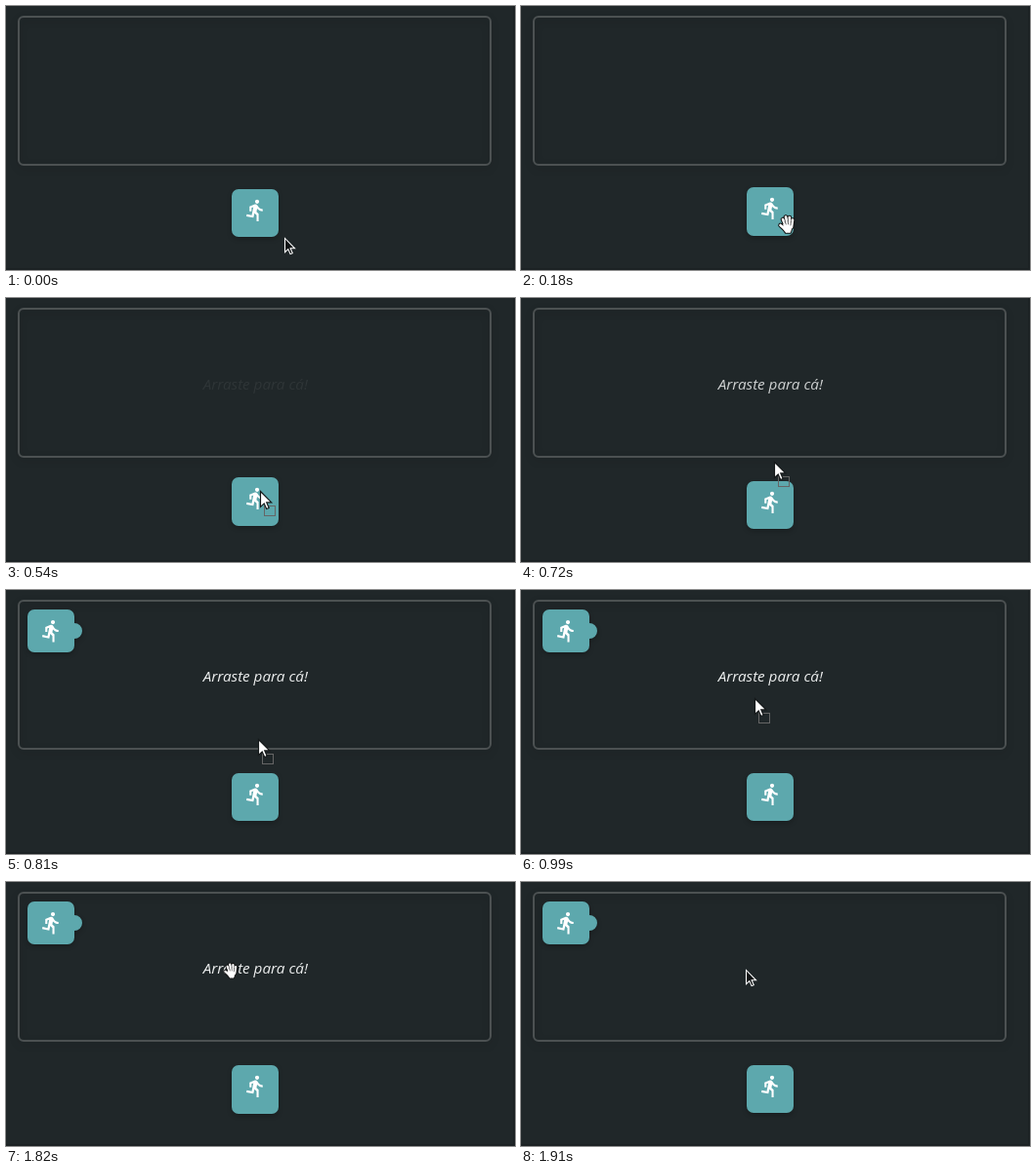
An HTML page with a canvas for the animation above (2.45 s loop, 521x271 px).

```html
<!DOCTYPE html>
<html lang="pt">
<head>
<meta charset="utf-8">
<title>Arraste</title>
<style>
html, body { margin: 0; width: 100%; height: 100%; overflow: hidden; background: #202729; }
canvas { display: block; width: 521px; height: 271px; }
</style>
</head>
<body>
<canvas id="stage" width="521" height="271"></canvas>
<script>
const ctx = document.getElementById('stage').getContext('2d');
const LOOP = 2450, STEP = 90;
const TEAL = '#5da8ad';

const runner = new Path2D('M13.49 5.48c1.1 0 2-.9 2-2s-.9-2-2-2-2 .9-2 2 .9 2 2 2zm-3.6 13.9l1-4.4 2.1 2v6h2v-7.5l-2.1-2 .6-3c1.3 1.5 3.3 2.5 5.5 2.5v-2c-1.9 0-3.5-1-4.3-2.4l-1-1.6c-.4-.6-1-1-1.7-1-.3 0-.5.1-.8.1l-5.2 2.2v4.7h2v-3.4l1.8-.7-1.6 8.1-4.9-1-.4 2 7 1.4z');
const arrow = new Path2D('M0 0V15L3.5 11.7L5.8 17L8.2 16L5.9 10.8H10.6Z');
const fingers = new Path2D('M-4 -5L-1 2M-1 -7.5L1 1M2.8 -7L3 1M6 -4.5L5 3M-6.5 1L-2 5');
const palm = new Path2D('M-3 0L5.5 0L5 4L3.5 8.5L-1 8.5L-4 4Z');

// Pointer path: time, x, y
const track = [[0, 284.5, 237.5], [360, 260, 210], [540, 260, 198], [810, 258, 152.5], [1080, 230, 90]];
// Button lift and label opacity, one value per step
const lifts = [0, 0, 2, 4, 5, 5, 4, 1];
const fade = { 6: .07, 7: .5, 8: .85 };

function pointer(t) {
  const i = track.findIndex(key => key[0] > t);
  if (i < 0) return track.at(-1).slice(1);
  const [t0, x0, y0] = track[i - 1], [t1, x1, y1] = track[i];
  const k = (t - t0) / (t1 - t0);
  return [Math.round(x0 + (x1 - x0) * k), Math.round(y0 + (y1 - y0) * k)];
}

function at(x, y, scale, draw) {
  ctx.save();
  ctx.translate(x, y);
  ctx.scale(scale, scale);
  draw();
  ctx.restore();
}

function shadow(alpha, blur, y) {
  ctx.shadowColor = `rgba(0,0,0,${alpha})`;
  ctx.shadowBlur = blur;
  ctx.shadowOffsetY = y;
}

function tile(x, y, h, tab) {
  ctx.save();
  shadow(.25, 5, 2);
  ctx.fillStyle = TEAL;
  ctx.beginPath();
  ctx.roundRect(x, y, 48, h, 7);
  if (tab) {
    ctx.moveTo(x + 56, y + 22);
    ctx.arc(x + 48, y + 22, 8, 0, Math.PI * 2);
  }
  ctx.fill();
  ctx.restore();
  at(x + 12, y + (tab ? 9.5 : 9.2), 1.04, () => {
    ctx.fillStyle = '#fff';
    ctx.fill(runner);
  });
}

function drawArrow(x, y, fill, line, scale = 1) {
  at(x + .5, y + .5, scale, () => {
    ctx.fillStyle = fill;
    ctx.strokeStyle = line;
    ctx.lineWidth = 1.1;
    ctx.fill(arrow);
    ctx.stroke(arrow);
  });
}

function drawHand(x, y, scale) {
  at(x, y, scale, () => {
    ctx.lineCap = ctx.lineJoin = 'round';
    for (const [color, width] of [['#111', 4.6], ['#fff', 2.6]]) {
      ctx.strokeStyle = ctx.fillStyle = color;
      ctx.lineWidth = width;
      ctx.stroke(fingers);
      ctx.lineWidth = width - 2;
      ctx.stroke(palm);
      ctx.fill(palm);
    }
    ctx.strokeStyle = '#222';
    ctx.lineWidth = .7;
    ctx.stroke(new Path2D('M-2 -3L-.7 0M1.1 -4L1.6 0M4.3 -3L4 1'));
  });
}

function drawDrag(x, y) {
  ctx.save();
  ctx.lineWidth = 1;
  ctx.strokeStyle = '#111';
  ctx.strokeRect(x + 4.5, y + 15.5, 11, 10);
  ctx.strokeStyle = '#bbb';
  ctx.setLineDash([1, 1]);
  ctx.strokeRect(x + 4.5, y + 15.5, 11, 10);
  ctx.restore();
  drawArrow(x, y, '#fff', '#15191a', 1.06);
}

function drawForbidden(x, y) {
  drawArrow(x, y, '#15191a', '#ddd', .85);
  ctx.beginPath();
  ctx.arc(x + 7.5, y + 17.3, 6.3, 0, Math.PI * 2);
  ctx.fillStyle = '#202729';
  ctx.fill();
  ctx.moveTo(x + 3, y + 12.8);
  ctx.lineTo(x + 12, y + 21.8);
  ctx.strokeStyle = '#e4e4e4';
  ctx.lineWidth = 2.3;
  ctx.stroke();
}

function drawPointer(t) {
  const [x, y] = pointer(t);
  if (t < 180 || t >= 1910) drawArrow(x, y, '#101314', '#fff', .95);
  else if (t < 450) drawHand(x, y, 1);
  else if (t < 1170) drawDrag(x, y);
  else if (t < 1820) drawForbidden(x, y);
  else drawHand(x, y + 1, .85);
}

function render(t) {
  const step = Math.floor(t / STEP);
  ctx.fillStyle = '#202729';
  ctx.fillRect(0, 0, 521, 271);
  ctx.fillStyle = '#1c2224';
  ctx.fillRect(0, 269, 521, 2);
  ctx.fillRect(519, 0, 2, 271);

  ctx.save();
  shadow(.2, 8, 3);
  ctx.strokeStyle = '#4c5152';
  ctx.lineWidth = 2;
  ctx.beginPath();
  ctx.roundRect(13, 11, 483, 152, 5);
  ctx.stroke();
  ctx.restore();

  if (t >= 810) tile(22, 20, 44, true);
  if (step >= 6 && t < 1910) {
    ctx.globalAlpha = fade[step] ?? 1;
    ctx.fillStyle = '#eceeee';
    ctx.font = 'italic 15.3px "Open Sans", "Noto Sans", sans-serif';
    ctx.textAlign = 'center';
    ctx.fillText('Arraste para cá!', 255.3, 94);
    ctx.globalAlpha = 1;
  }

  const lift = lifts[step] ?? 0;
  const tall = lift > 0 || (t >= 1820 && t < 1910);
  tile(231, 188 - lift, tall ? 50 : 49, false);
  drawPointer(t);
}

// The pose holds for each step, with two longer rests
function hold(t) {
  if (t < 1170) return Math.floor(t / STEP) * STEP;
  return t < 1820 ? 1170 : t < 1910 ? 1820 : 1910;
}

const start = performance.now();
function tick() {
  render(hold((performance.now() - start) % LOOP));
  requestAnimationFrame(tick);
}
tick();
</script>
</body>
</html>
```
